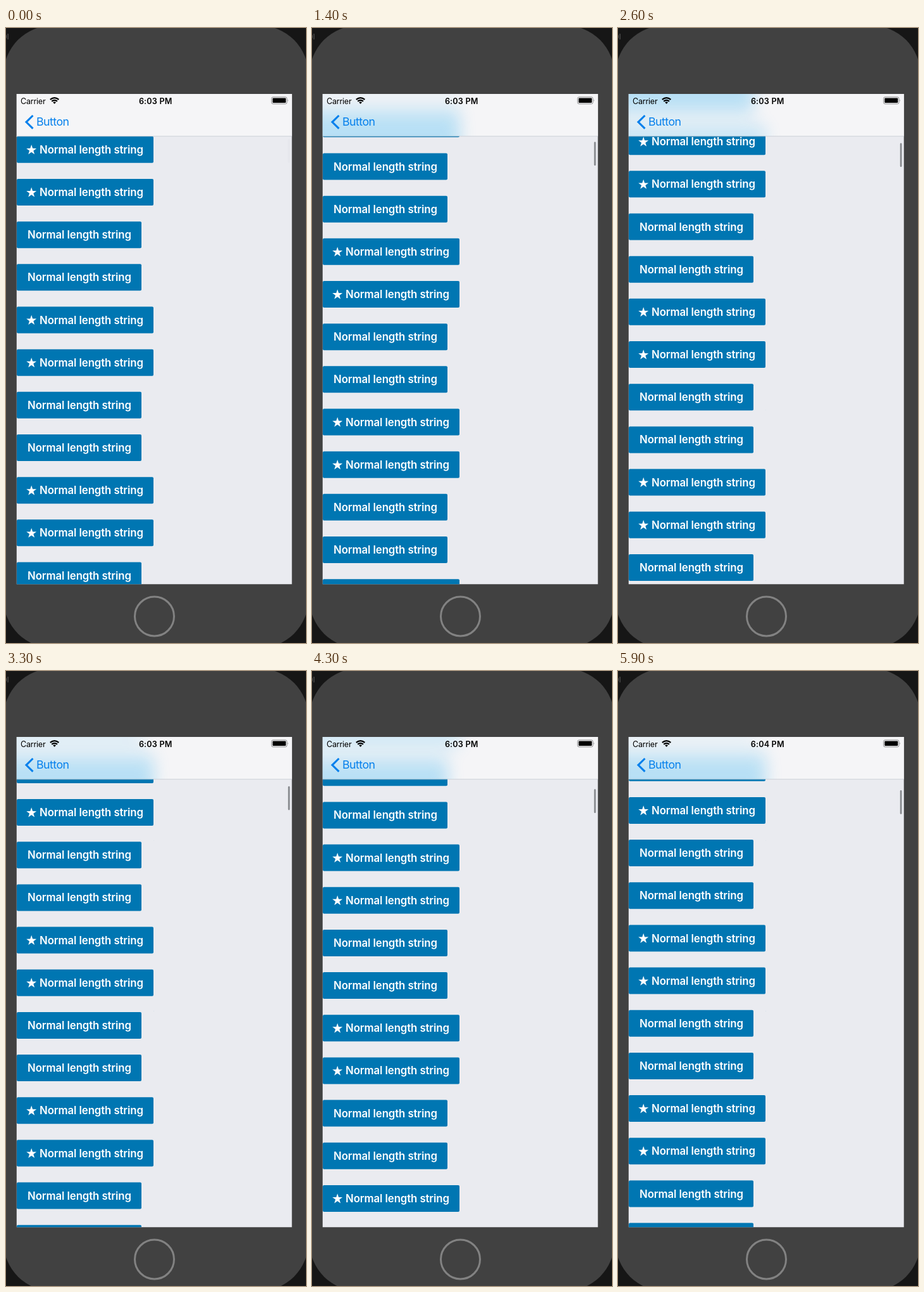
Recreate the animation shown at these times as an HTML page. Size 474x970 px, loop 6 s.

```html
<!DOCTYPE html>
<html lang="en">
<head>
<meta charset="utf-8">
<title>Button list</title>
<style>
  html, body { margin: 0; width: 100%; height: 100%; overflow: hidden; background: #161616; }
  svg { display: block; font-family: Inter, Roboto, sans-serif; }
  .label { font-size: 16.8px; font-weight: 600; letter-spacing: -.0055em; fill: #fff; }
  .status { font-size: 12.6px; letter-spacing: -.02em; }
  .clock { font-size: 12.6px; font-weight: 600; letter-spacing: .015em; text-anchor: middle; }
  .back { font-size: 17.8px; letter-spacing: -.03em; fill: #0680ec; }
</style>
</head>
<body>
<svg width="474" height="970" viewBox="0 0 474 970" fill="none">
  <defs>
    <clipPath id="screen"><rect x="16.8" y="104" width="434.9" height="773.2"/></clipPath>
    <clipPath id="bar"><rect x="-60" y="104" width="560" height="66.6"/></clipPath>
    <filter id="blur" filterUnits="userSpaceOnUse" x="-60" y="30" width="560" height="220"
            color-interpolation-filters="sRGB">
      <feGaussianBlur stdDeviation="13 15"/>
    </filter>
    <g id="strip" clip-path="url(#bar)"><g id="under" fill="#00a1f0"></g></g>
  </defs>

  <text x="-6" y="18" font-size="12" fill="#5c5c5c">0I</text>
  <rect x="-4" y="-4" width="482" height="982" rx="78" fill="#414141"/>
  <circle cx="234.5" cy="928" r="31" stroke="#828282" stroke-width="3"/>

  <g clip-path="url(#screen)">
    <rect y="104" width="474" height="774" fill="#eaebf0"/>
    <g id="list"></g>
    <rect id="thumb" x="445.7" y="175" width="2.7" height="37.7" rx="1.35" fill="#85878c"/>

    <!-- Translucent bar: the rows behind it, mirrored at its edges, then blurred -->
    <g clip-path="url(#bar)">
      <rect y="104" width="474" height="67" fill="#f5f5f7"/>
      <g filter="url(#blur)" opacity=".25">
        <use href="#strip"/>
        <use href="#strip" transform="matrix(1 0 0 -1 0 208)"/>
        <use href="#strip" transform="matrix(1 0 0 -1 0 341.2)"/>
      </g>
    </g>
    <rect y="170.4" width="474" height=".8" fill="#c5cad3"/>

    <g fill="#000">
      <text class="status" x="23" y="119.5">Carrier</text>
      <text class="clock" id="clock" x="236.2" y="119.5">6:03 PM</text>
    </g>
    <text class="back" x="48" y="154.4">Button</text>
    <path d="M42.5 138 L32 148.3 L42.5 158.6" stroke="#0680ec" stroke-width="3.1"/>
    <g stroke="#000" stroke-width="2.1">
      <path d="M69.8 112.9 Q76.6 107.2 83.4 112.9"/>
      <path d="M72.2 115.6 Q76.6 112 81 115.6"/>
    </g>
    <path d="M74.2 117.3 Q76.6 115.4 79 117.3 L76.6 119.8 Z" fill="#000"/>
    <rect x="419.5" y="108.9" width="24.4" height="10.8" rx="2.4" stroke="#8b8b8d"/>
    <rect x="421.2" y="110.6" width="21" height="7.4" rx="1" fill="#000"/>
    <path d="M445.3 112.5 q1.6 1.8 0 3.6 z" fill="#8b8b8d"/>
  </g>
</svg>
<script>
const LOOP = 6000, STEP = 100;
const LEFT = 17, TOP = 170.8, PITCH = 67.17, ROWS = 30;
const TAU = 500;    // time constant of the scroll deceleration, ms
const EASE = 2.25;  // how the finger speeds up before letting go

// Each flick drags from `start` to `release`, then coasts to `to`.
const flicks = [
  { start: 506, release: 1060, from: 0, to: 567.3, coast: 377 },
  { start: 3150, release: 3900, from: 567.3, to: 1119.8, coast: 329 }
];

const $ = id => document.getElementById(id);
const list = $('list'), under = $('under'), thumb = $('thumb'), clock = $('clock');

function star(cx, cy, r) {
  const points = Array.from({ length: 10 }, (_, i) => {
    const a = (i / 5 - .5) * Math.PI, d = i % 2 ? r * .39 : r;
    return (cx + d * Math.cos(a)).toFixed(2) + ',' + (cy + d * Math.sin(a)).toFixed(2);
  });
  return `<polygon points="${points.join(' ')}" fill="#fff"/>`;
}

function buildRows() {
  let rows = '', shades = '';
  for (let i = 0; i < ROWS; i++) {
    const y = TOP + i * PITCH, starred = i % 4 < 2;
    const width = starred ? 216 : 197;
    rows += `<rect x="${LEFT}" y="${y}" width="${width}" height="42" rx="2" fill="#0076b2"/>`
      + (starred ? star(LEFT + 23.2, y + 21.7, 8.4) : '')
      + `<text class="label" x="${LEFT + (starred ? 36 : 17)}" y="${y + 27.1}">Normal length string</text>`;
    shades += `<rect x="-60" y="${y}" width="${width + LEFT + 60}" height="42"/>`;
  }
  list.innerHTML = rows;
  under.innerHTML = shades;
}

function scrollAt(t) {
  const f = t < flicks[1].start ? flicks[0] : flicks[1];
  if (t < f.start) return f.from;
  if (t >= f.release) return f.to - f.coast * Math.exp((f.release - t) / TAU);
  const p = (t - f.start) / (f.release - f.start);
  return f.from + (f.to - f.coast - f.from) * p ** EASE;
}

function draw() {
  const t = Math.floor(performance.now() % LOOP / STEP) * STEP;
  const y = scrollAt(t), shift = `translate(0 ${-y})`;
  list.setAttribute('transform', shift);
  under.setAttribute('transform', shift);
  thumb.setAttribute('transform', `translate(0 ${y * .0117})`);
  thumb.setAttribute('opacity', Math.min(1, Math.max(.04, (t - flicks[0].start) / 200)));
  clock.textContent = t < 5000 ? '6:03 PM' : '6:04 PM';
  requestAnimationFrame(draw);
}

buildRows();
draw();
</script>
</body>
</html>
```
